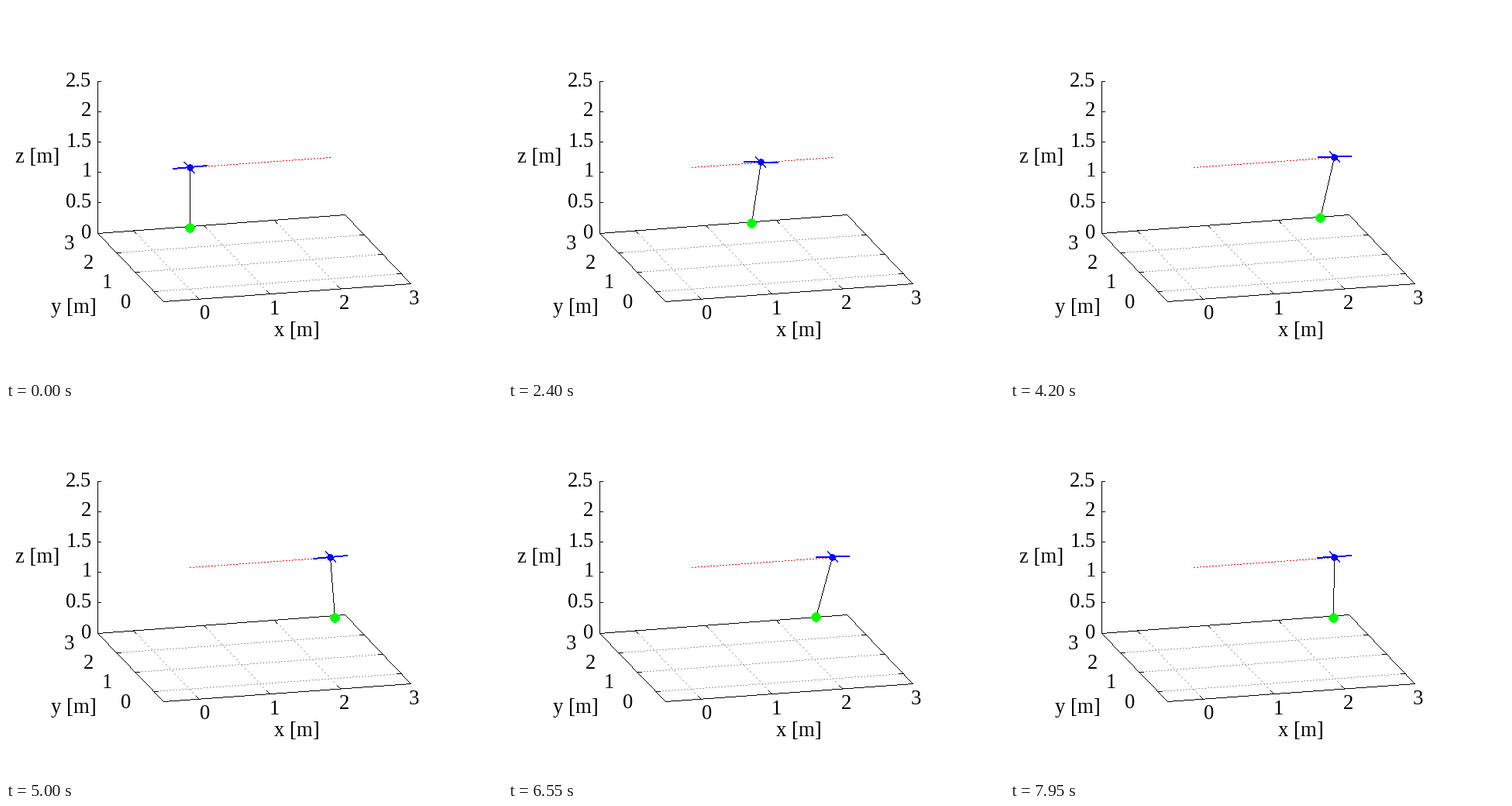
A matplotlib script that plays this animation: 640x480 px, repeating every 8 s.

```python
import numpy as np
import matplotlib.pyplot as plt
from matplotlib.animation import FuncAnimation

W, H, DPI = 640, 480, 100
STEP_MS, FRAMES = 50, 160
WHITE, BLACK, GRAY = (255, 255, 255), (0, 0, 0), (160, 160, 160)
RED, GREEN, BLUE = (255, 0, 0), (0, 255, 0), (0, 0, 255)

# Oblique projection of the 3D axes onto the stage, in pixels.
ORIGIN = np.array([236.6, 364.97])
EX = np.array([90.94, -6.68])
EY = np.array([-24.3, -25.2])
EZ = np.array([0, -78.48])
LOW, HIGH = -0.5, 3

# Drone with a hanging load, driven by bang-bang acceleration.
G, ROPE, ACCEL, START = 9.81, 1.0, 1.0, 1.0
HALF = np.sqrt(2)
OMEGA = np.sqrt(G / ROPE)
SWITCHES = [(START, 1), (START + HALF, -2), (START + 2 * HALF, 1)]
HEIGHT, ARM, LOAD_SHARE = 2, 0.242, 0.28

plt.rcParams["font.family"] = "Liberation Serif"
plt.rcParams["font.size"] = 26.67 * 72 / DPI

fig = plt.figure(figsize=(W / DPI, H / DPI), dpi=DPI, facecolor="white")
ax = fig.add_axes([0, 0, 1, 1])
ax.axis("off")


def project(x, y, z):
    return ORIGIN + x * EX + y * EY + z * EZ


def pixel(point):
    return np.rint(point).astype(int)


def draw_line(canvas, a, b, color, width=1, dotted=False):
    """Hard-edged line: one pixel per step, widened across its main direction."""
    a, b = pixel(a), pixel(b)
    steps = max(np.abs(b - a))
    xs, ys = np.rint(np.linspace(a, b, steps + 1)).astype(int).T
    if dotted:
        on = np.arange(steps + 1) % 4 < 2
        xs, ys = xs[on], ys[on]
    steep = abs(b[1] - a[1]) > abs(b[0] - a[0])
    for shift in range(width):
        if steep:
            canvas[ys, xs - shift] = color
        else:
            canvas[ys - shift, xs] = color


def draw_disc(canvas, center, radius, color):
    cx, cy = pixel(center)
    ys, xs = np.ogrid[:H, :W]
    canvas[(xs - cx) ** 2 + (ys - cy) ** 2 <= (radius + 0.3) ** 2] = color


def grid_line(canvas, a, b, tick=5):
    draw_line(canvas, a, b, GRAY, dotted=True)
    inward = (b - a) / np.linalg.norm(b - a) * tick
    draw_line(canvas, a, a + inward, BLACK)
    draw_line(canvas, b, b - inward, BLACK)


def draw_axes():
    canvas = np.full((H, W, 3), WHITE, np.uint8)
    for k in range(3):
        grid_line(canvas, project(k, LOW, 0), project(k, HIGH, 0))
        grid_line(canvas, project(LOW, k, 0), project(HIGH, k, 0))
    corners = [project(x, y, 0) for x, y in
               [(LOW, LOW), (HIGH, LOW), (HIGH, HIGH), (LOW, HIGH)]]
    for a, b in zip(corners, corners[1:] + corners[:1]):
        draw_line(canvas, a, b, BLACK)
    draw_line(canvas, corners[3], project(LOW, HIGH, 2.5), BLACK)
    for z in np.arange(0, 2.6, 0.5):
        tick = project(LOW, HIGH, z)
        draw_line(canvas, tick, tick + (4, 0), BLACK)
    draw_line(canvas, project(0, 0, HEIGHT), project(2, 0, HEIGHT), RED,
              dotted=True)
    return canvas


def label(x, baseline, text, align="center"):
    ax.text(x, baseline, text, ha=align, va="baseline")


def draw_labels():
    for k in range(4):
        label(256 + 90 * k, 403.6 - 6.5 * k, str(k))
        label(154.2 - 24.3 * k, 389 - 25.1 * k, str(k))
    for z in np.arange(0, 2.6, 0.5):
        label(110, pixel(project(LOW, HIGH, z))[1] + 6, f"{z:g}", "right")
    label(345, 426, "x [m]", "left")
    label(57, 396, "y [m]", "left")
    label(12, 202, "z [m]", "left")


def motion(t):
    """Drone position, drone pitch and rope angle at time t in seconds."""
    x = accel = swing = 0
    for switch, gain in SWITCHES:
        dt = t - switch
        if dt > 1e-9:
            accel += gain * ACCEL
            x += gain * ACCEL * dt ** 2 / 2
            swing -= gain * ACCEL / G * (1 - np.cos(OMEGA * dt))
    pitch = (1 - LOAD_SHARE) * accel / G - LOAD_SHARE * swing
    return x, pitch, swing


background = draw_axes()
stage = ax.imshow(background, interpolation="nearest", aspect="auto")
draw_labels()


def update(frame):
    x, pitch, swing = motion(frame * STEP_MS / 1000)
    center = project(x, 0, HEIGHT)
    bob = project(x + ROPE * np.sin(swing), 0, HEIGHT - ROPE * np.cos(swing))
    along = ARM * (np.cos(pitch) * EX - np.sin(pitch) * EZ)
    across = 1.1 * ARM * EY

    canvas = background.copy()
    draw_line(canvas, center, bob, BLACK)
    draw_line(canvas, center - along, center + along, BLUE, width=2)
    draw_line(canvas, center - across, center + across, BLUE, width=2)
    draw_disc(canvas, center, 4, BLUE)
    draw_disc(canvas, bob, 6, GREEN)
    stage.set_data(canvas)
    return [stage]


anim = FuncAnimation(fig, update, frames=FRAMES, interval=STEP_MS,
                     repeat=True, repeat_delay=0, blit=False)
plt.show()
```
